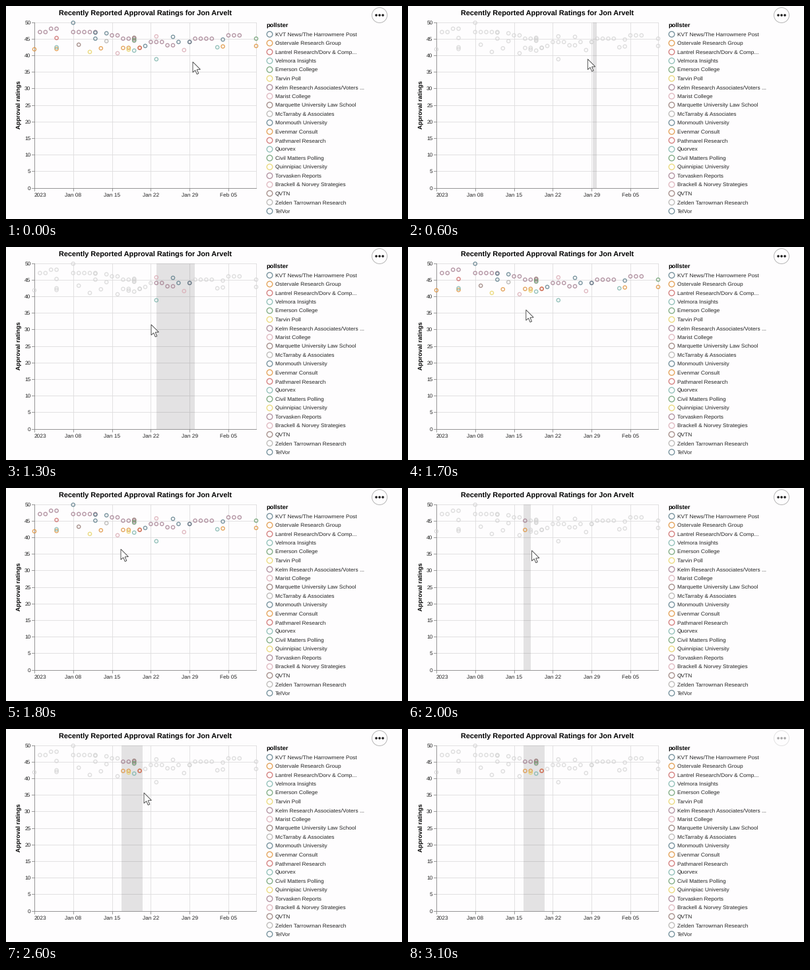
Animation of 600 by 324 pixels, one loop 3200 ms. Source, as a matplotlib script:

```python
import numpy as np
import matplotlib.pyplot as plt
from matplotlib.animation import FuncAnimation
from matplotlib.colors import to_rgba
from matplotlib.patches import Circle, Polygon, Rectangle

plt.rcParams["font.family"] = "Liberation Sans"
plt.rcParams["text.hinting"] = "none"

W, H, DPI = 600, 324, 100
PT = 72 / DPI                      # points per pixel
LEFT, TOP, RIGHT, BOTTOM = 43, 24.5, 379, 276.5
DAY, UNIT = 8.4, 5.04              # pixels per day and per rating point
FRAMES, STEP = 32, 100

COLORS = {
    "blue": "#5a7b88", "orange": "#de9038", "red": "#cb6664",
    "teal": "#7cb4ab", "green": "#689c6c", "yellow": "#e7d364",
    "purple": "#a27d8e", "pink": "#daabb4", "brown": "#937872",
    "gray": "#b0aeab",
}
POLLSTERS = [
    "KVT News/The Harrowmere Post", "Ostervale Research Group",
    "Lantrel Research/Dorv & Comp...", "Velmora Insights",
    "Emerson College", "Tarvin Poll", "Kelm Research Associates/Voters ...",
    "Marist College", "Marquette University Law School",
    "McTarraby & Associates", "Monmouth University", "Evenmar Consult",
    "Pathmarel Research", "Quorvex", "Civil Matters Polling",
    "Quinnipiac University", "Torvasken Reports",
    "Brackell & Norvey Strategies", "QVTN", "Zelden Tarrowman Research",
    "TelVor",
]


def px(day):
    return LEFT + DAY * day


def py(rating):
    return BOTTOM - UNIT * rating


def tracker():
    """Weekday tracker: whole ratings along a dipping curve."""
    days = [d for d in range(1, 38) if d % 7 < 5]
    curve = np.interp(days, [1, 3.5, 7, 10, 17, 25, 29, 32, 35],
                      [47, 48, 47, 47, 45, 43, 45, 45, 46])
    return [("purple", d, r) for d, r in zip(days, np.round(curve))]


def trend(color, level, slope, *days):
    """Occasional polls along a straight line."""
    return [(color, d, level + slope * d) for d in days]


polls = (
    tracker()
    + trend("orange", 41.8, 0.025, 0, 4, 12, 16, 17, 19, 34, 40)
    + trend("red", 46, -0.2, 4, 19)
    + trend("teal", 42.4, 0, 4, 33)
    + trend("teal", 53.1, -0.65, 18, 22)
    + trend("blue", 47.8, -0.09, 11, 13, 25, 34)
    + trend("blue", 47.7, -0.245, 11, 20)
    + trend("blue", 44, 0, 26, 28)
    + trend("blue", 49.8, 0, 7)
    + trend("yellow", 40, 0.1, 10, 17)
    + trend("gray", 44, 0.02, 13, 18)
    + trend("pink", 39.4, 0.08, 15, 27)
    + trend("pink", 45.7, 0, 22)
    + trend("brown", 41.5, 0.21, 8, 18)
    + trend("green", 44.2, 0.02, 18, 40)
)

fig = plt.figure(figsize=(W / DPI, H / DPI), dpi=DPI, facecolor="#fefdfe")
ax = fig.add_axes([0, 0, 1, 1])
ax.set_xlim(0, W)
ax.set_ylim(H, 0)
ax.axis("off")


def line(xs, ys, color, z):
    ax.plot(xs, ys, color=color, lw=0.84 * PT, zorder=z)


def label(x, y, text, size=8.4, ha="left", color="#222222", **kw):
    """Text whose capitals are centred on y."""
    ax.text(x, y + 0.36 * size, text, size=size * PT, ha=ha,
            va="baseline", color=color, **kw)


def draw_axes():
    for r in range(0, 51, 5):
        y = py(r)
        line([LEFT, RIGHT], [y, y], "#dddddd", 1)
        line([LEFT - 4.2, LEFT], [y, y], "#888888", 3)
        label(37.5, y, str(r), ha="right")
    dates = ["2023", "Jan 08", "Jan 15", "Jan 22", "Jan 29", "Feb 05"]
    for i, date in enumerate(dates):
        x = px(7 * i)
        line([x, x], [TOP, BOTTOM], "#dddddd", 1)
        line([x, x], [BOTTOM, BOTTOM + 4.2], "#888888", 3)
        label(x, 287, date, ha="center" if i else "left")
    line([RIGHT, RIGHT], [TOP, BOTTOM], "#dddddd", 1)
    line([LEFT, RIGHT], [BOTTOM, BOTTOM], "#888888", 3)
    line([LEFT, LEFT], [TOP, BOTTOM], "#888888", 3)
    label((LEFT + RIGHT) / 2, 11, "Recently Reported Approval Ratings for "
          "Jon Arvelt", 10.92, "center", "black", weight="bold")
    ax.text(20, (TOP + BOTTOM) / 2, "Approval ratings", size=9.24 * PT,
            weight="bold", rotation=90, ha="center", va="center")


def draw_legend():
    label(394.5, 29.2, "pollster", 9.24, color="black", weight="bold")
    hues = list(COLORS.values())
    for i, name in enumerate(POLLSTERS):
        y = 43 + 13.45 * i
        ax.add_patch(Circle((399.5, y), 4.3, fill=False, lw=1.3 * PT,
                            ec=to_rgba(hues[i % len(hues)], 0.85)))
        label(407.8, y, name)


draw_axes()
draw_legend()

xs = np.array([px(d) for _, d, _ in polls])
ys = np.array([py(r) for _, _, r in polls])
hues = np.array([to_rgba(COLORS[c], 0.8) for c, _, _ in polls])
faded = np.array(to_rgba("#d3d3d3", 0.75))
dots = ax.scatter(xs, ys, s=(5.2 * PT) ** 2, facecolors="none",
                  edgecolors=hues, linewidths=1.4 * PT, zorder=4)

brush = Rectangle((0, TOP), 0, BOTTOM - TOP, fc="#333333", alpha=0.13,
                  lw=0, zorder=2)
ax.add_patch(brush)

ARROW = np.array([(0, 0), (0, 16), (3.7, 12.7), (6.3, 18.7), (8.8, 17.6),
                  (6.2, 11.8), (11.4, 11.5)])
cursor = Polygon(ARROW, closed=True, fc="white", ec="#444444",
                 lw=0.9 * PT, zorder=6)
ax.add_patch(cursor)

menu = [Circle((566, 14), 11.5, fill=False, ec="#b0b0b0", lw=0.9 * PT)]
menu += [Circle((566 + dx, 14), 1.8, fc="#222222", lw=0)
         for dx in (-5, 0, 5)]
for part in menu:
    ax.add_patch(part)

# Cursor stops: frame, x, y
STOPS = [(0, 283, 85), (5, 285, 81), (8, 236, 80), (13, 220, 118),
         (18, 174, 93), (22, 201, 97), (26, 209, 97)]
DRAG1, RELEASE, CLEAR, DRAG2, LEAVE = 5, 13, 16, 19, 30


def cursor_at(i):
    for (i0, *a), (i1, *b) in zip(STOPS, STOPS[1:]):
        if i <= i1:
            t = (i - i0) / (i1 - i0)
            return np.array(a) + (np.array(b) - a) * t * t * (3 - 2 * t)
    return np.array(STOPS[-1][1:])


def selection(i):
    """Edges of the brush, which trails the cursor, or None."""
    if DRAG1 <= i < CLEAR:
        return min(cursor_at(min(i, RELEASE))[0] + 7.5, 284.5), 285.5
    if i >= DRAG2:
        return 174.5, cursor_at(i)[0] - 2
    return None


def update(i):
    span = selection(i)
    brush.set_visible(span is not None)
    if span:
        lo, hi = span
        brush.set_x(lo)
        brush.set_width(hi - lo)
        inside = (xs >= lo) & (xs <= hi)
        dots.set_edgecolors(np.where(inside[:, None], hues, faded))
    else:
        dots.set_edgecolors(hues)

    cursor.set_xy(ARROW + cursor_at(i))
    cursor.set_visible(i < LEAVE)

    for part in menu:
        part.set_alpha(np.interp(i, [LEAVE - 1, LEAVE + 1], [1, 0.38]))
    return [brush, dots, cursor, *menu]


anim = FuncAnimation(fig, update, frames=FRAMES, interval=STEP,
                     init_func=lambda: update(0), repeat=True,
                     repeat_delay=0, blit=False)
plt.show()
```
